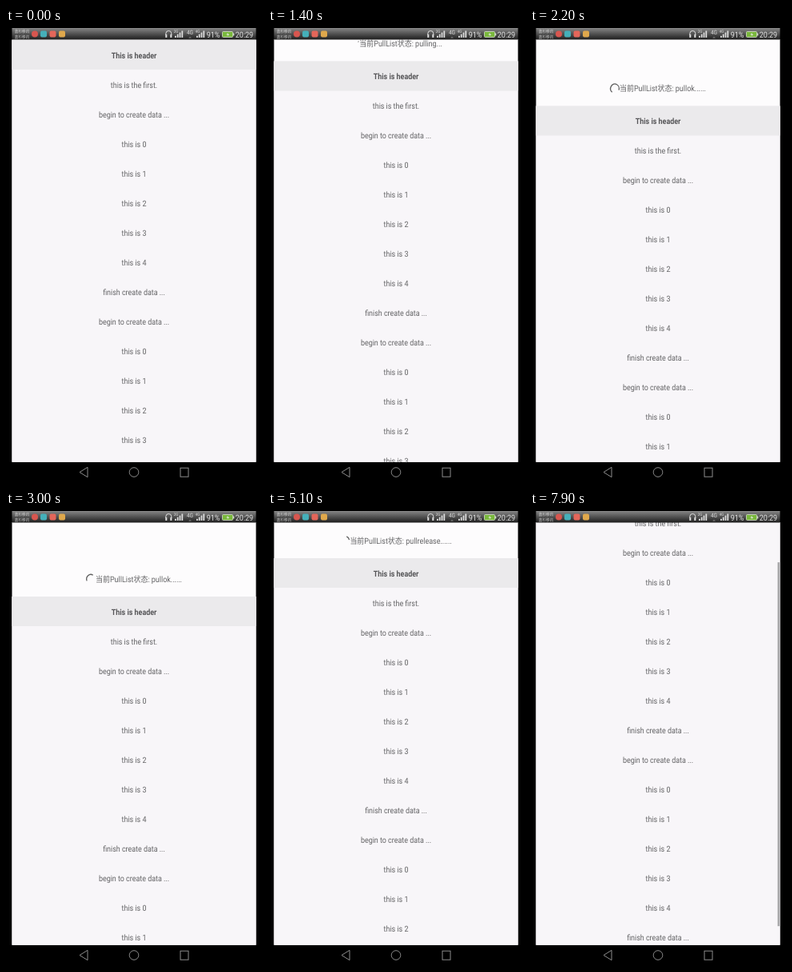
An HTML page that plays this animation: 320x569 px, repeating every 8000 ms.

```html
<!DOCTYPE html>
<html lang="en">
<head>
<meta charset="utf-8">
<title>Pull to refresh list</title>
<style>
  html, body { margin: 0; width: 100%; height: 100%; overflow: hidden; background: #000; }
  svg { display: block; width: 320px; height: 569px; }
  text { font-family: Roboto, "Noto Sans CJK SC", "Noto Sans CJK", sans-serif; text-rendering: geometricPrecision; }
</style>
</head>
<body>
<svg id="stage" viewBox="0 0 320 569">
  <defs>
    <linearGradient id="bar" x2="0" y2="1">
      <stop offset="0" stop-color="#868686"/>
      <stop offset="1" stop-color="#1e1e1e"/>
    </linearGradient>
    <clipPath id="view"><rect x="7.5" y="14" width="305" height="528.8"/></clipPath>
  </defs>
  <rect width="320" height="569" fill="#000"/>
  <g clip-path="url(#view)">
    <rect x="7" y="14" width="306" height="529" fill="#fdfcfd"/>
    <g id="list">
      <rect x="7" y="15" width="306" height="700" fill="#f8f6f9"/>
      <rect x="7" y="15" width="306" height="37" fill="#ebeaec"/>
    </g>
    <g id="pull">
      <path id="arc" fill="none" stroke="#606060" stroke-width="1.3"/>
    </g>
    <rect id="thumb" x="309.5" width="2.5" height="455" fill="#a8a8aa"/>
  </g>
  <g id="status">
    <rect x="7.5" width="305" height="14.5" fill="url(#bar)"/>
    <circle cx="36" cy="7.5" r="4" fill="#d8564f"/>
    <rect x="43" y="3.5" width="8" height="8" rx="2" fill="#45b0ba"/>
    <rect x="54.5" y="3.5" width="8" height="8" rx="2" fill="#e4665a"/>
    <rect x="66" y="3.5" width="8" height="8" rx="2" fill="#dfa84c"/>
    <path d="M199.8 9V7a3.5 3.5 0 0 1 7 0V9" fill="none" stroke="#ddd"/>
    <path d="M199.3 8h2v4h-2zM205.3 8h2v4h-2z" fill="#ddd"/>
    <rect x="270.5" y="4.5" width="13" height="7" rx="1" fill="#79b83c" stroke="#ccd8c0" stroke-width=".9"/>
    <rect x="284" y="6.5" width="1.3" height="3" fill="#ccd8c0"/>
    <path d="M275 8.3l3-2-.5 1.6h2l-3 2 .5-1.6z" fill="#eee"/>
  </g>
  <g fill="none" stroke="#8c8c8c">
    <path d="M102 549.3v12.4L92 555.5z"/>
    <circle cx="160" cy="555.5" r="5.8"/>
    <rect x="218" y="550.2" width="10" height="11"/>
  </g>
</svg>
<script>
const $ = id => document.getElementById(id);
const LOOP = 8000, STEP = 100, ROW = 37, SQUEEZE = 0.88;

function add(parent, tag, attrs, content = '') {
  const el = document.createElementNS('http://www.w3.org/2000/svg', tag);
  for (const k in attrs) el.setAttribute(k, attrs[k]);
  el.textContent = content;
  return $(parent).appendChild(el);
}

// The screen is shown narrower than it is tall.
function label(parent, x, y, content, size = 10.15, fill = '#646466', weight = 400) {
  return add(parent, 'text', {
    transform: `translate(${x} ${y}) scale(${SQUEEZE} 1)`,
    'text-anchor': 'middle', 'font-size': size, 'font-weight': weight, fill
  }, content);
}

const batch = ['begin to create data ...', ...[0, 1, 2, 3, 4].map(n => 'this is ' + n), 'finish create data ...'];
label('list', 160, 37.6, 'This is header', 10.15, '#565658', 700);
['this is the first.', ...batch, ...batch].forEach((s, i) =>
  label('list', 160, 37.6 + ROW * (i + 1), s));
const note = label('pull', 166, 3.6, '', 10.2);

label('status', 20, 6.2, '蓝杉移讯', 5.2, '#d8d8d8');
label('status', 20, 13.2, '蓝杉移讯', 5.2, '#d0d0d0');
label('status', 212.5, 5.5, '2G', 5, '#ddd');
label('status', 230, 8, '4G', 7.4, '#ddd');
label('status', 230, 12.5, '46', 3, '#aaa');
label('status', 239.5, 5.5, '4G', 5, '#ddd');
label('status', 259, 11.7, '91%', 10.2, '#e2e2e2');
label('status', 298, 11.7, '20:29', 10.2, '#e2e2e2');
for (const x of [211, 238]) {
  for (let i = 0; i < 4; i++) {
    const h = 2.2 + i * 2.1;
    add('status', 'rect', { x: x + i * 2.8, y: 12 - h, width: 1.8, height: h, fill: '#ddd' });
  }
}

// [time, list offset]
const path = [
  [0, 0], [900, 0], [1000, 2], [1200, 12], [1400, 26.5], [1800, 58], [2000, 72],
  [2200, 82.5], [2400, 87.5], [2700, 90.5], [3000, 92], [3500, 92], [3600, 80],
  [3700, 59], [3800, 47], [3900, 44], [6300, 44], [6400, 30], [6500, 8], [6600, 0],
  [7300, 0], [7400, -2], [7500, -2], [7600, -14], [7700, -14], [7800, -36], [7900, -56]
];

function offsetAt(t) {
  const i = path.findIndex(p => p[0] >= t);
  if (i < 1) return path[0][1];
  const [t0, a] = path[i - 1], [t1, b] = path[i];
  return a + (b - a) * (t - t0) / (t1 - t0);
}

// cubic-bezier(.4, 0, .2, 1)
function ease(x) {
  if (x <= 0) return 0;
  if (x >= 1) return 1;
  let lo = 0, hi = 1, s;
  for (let i = 0; i < 20; i++) {
    s = (lo + hi) / 2;
    const v = 1 - s;
    if (1.2 * v * v * s + 0.6 * v * s * s + s ** 3 < x) lo = s; else hi = s;
  }
  return 3 * (1 - s) * s * s + s ** 3;
}

function arcPath(cx, t) {
  const time = t - 1400, turns = time / 1333 - 0.02;
  const p = turns - Math.floor(turns);
  const base = 330 + 0.108 * time + 90 * p;
  const from = base + 270 * ease(2 * p - 1);
  const to = Math.max(base + 270 * ease(2 * p), from + 8);
  const point = deg => {
    const a = deg * Math.PI / 180;
    return `${cx + 5.3 * Math.cos(a)} ${5.9 * Math.sin(a)}`;
  };
  return `M${point(from)}A5.3 5.9 0 ${to - from > 180 ? 1 : 0} 1 ${point(to)}`;
}

function draw(now) {
  const t = Math.floor(now % LOOP / STEP) * STEP;
  const y = offsetAt(t);
  $('list').setAttribute('transform', `translate(0 ${y})`);

  $('pull').style.display = y > 0 ? '' : 'none';
  if (y > 0) {
    const state = t >= 3600 ? 'pullrelease......' : y > 46 ? 'pullok......' : 'pulling...';
    const msg = '当前PullList状态: ' + state;
    if (note.textContent !== msg) note.textContent = msg;
    $('pull').setAttribute('transform', `translate(0 ${y - 6.7})`);
    $('arc').setAttribute('d', arcPath(160 - note.getComputedTextLength() * SQUEEZE / 2, t));
  }

  $('thumb').style.display = y < 0 ? '' : 'none';
  $('thumb').setAttribute('y', 16 - y * 0.86);
}

function tick() {
  draw(performance.now());
  requestAnimationFrame(tick);
}
tick();
</script>
</body>
</html>
```
